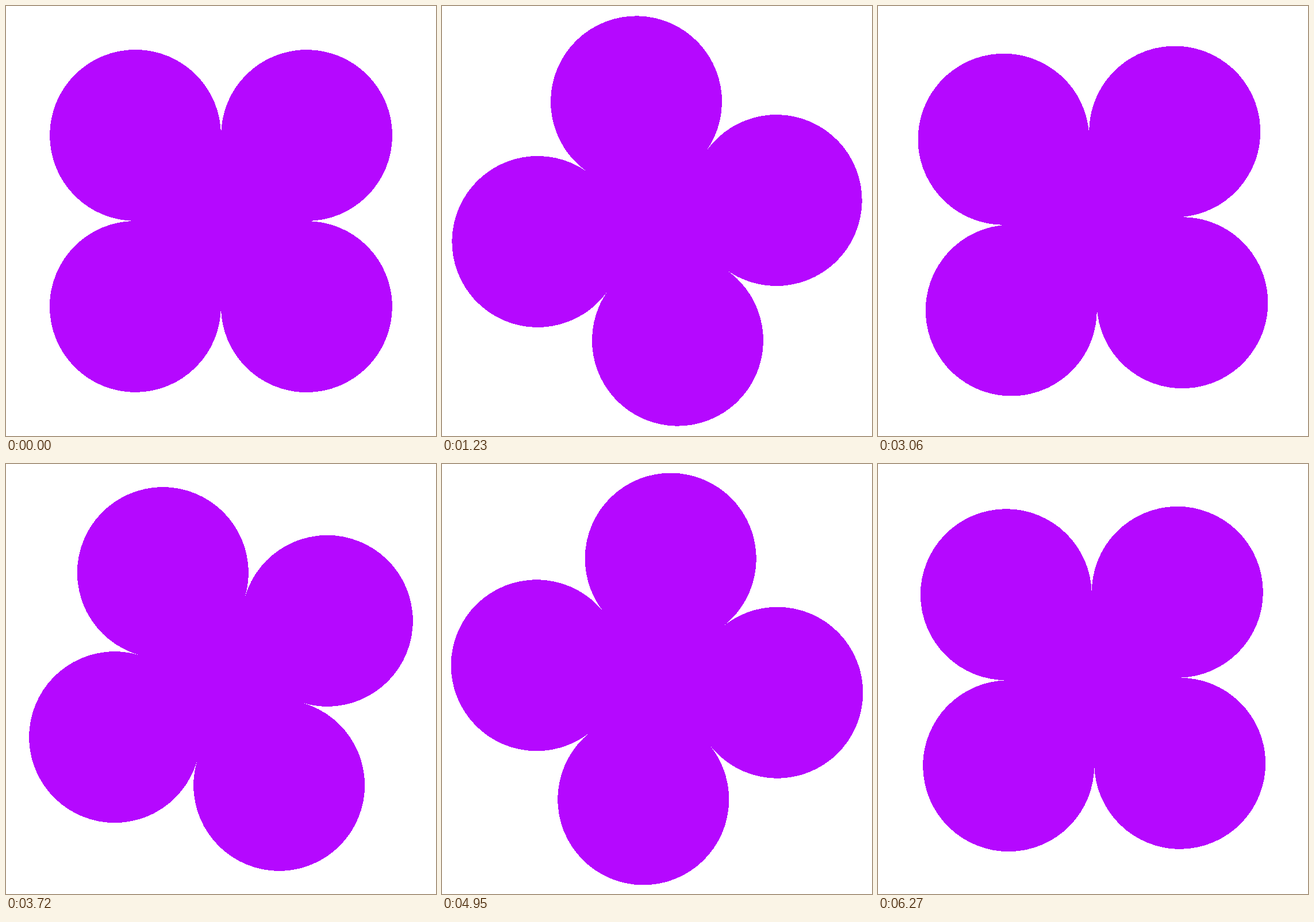
An HTML page for the animation above (6300 ms loop, 748 by 748 pixels).

```html
<!DOCTYPE html>
<html lang="en">
<head>
<meta charset="utf-8">
<title>Turning clover</title>
<style>
  html, body { margin: 0; width: 100%; height: 100%; overflow: hidden; background: #fff; }
  svg { display: block; width: 100vw; height: 100vh; }
</style>
</head>
<body>
<svg viewBox="-374 -374 748 748" shape-rendering="crispEdges">
  <g id="clover" fill="#b508ff">
    <rect x="-149" y="-149" width="298" height="298"/>
    <circle cx="-149" cy="-149" r="149"/>
    <circle cx="149" cy="-149" r="149"/>
    <circle cx="149" cy="149" r="149"/>
    <circle cx="-149" cy="149" r="149"/>
  </g>
</svg>
<script>
  const LOOP = 6300; // one half turn, in ms
  const clover = document.getElementById('clover');

  function draw() {
    const progress = performance.now() % LOOP / LOOP;
    clover.setAttribute('transform', `rotate(${180 * progress})`);
    requestAnimationFrame(draw);
  }
  draw();
</script>
</body>
</html>
```
